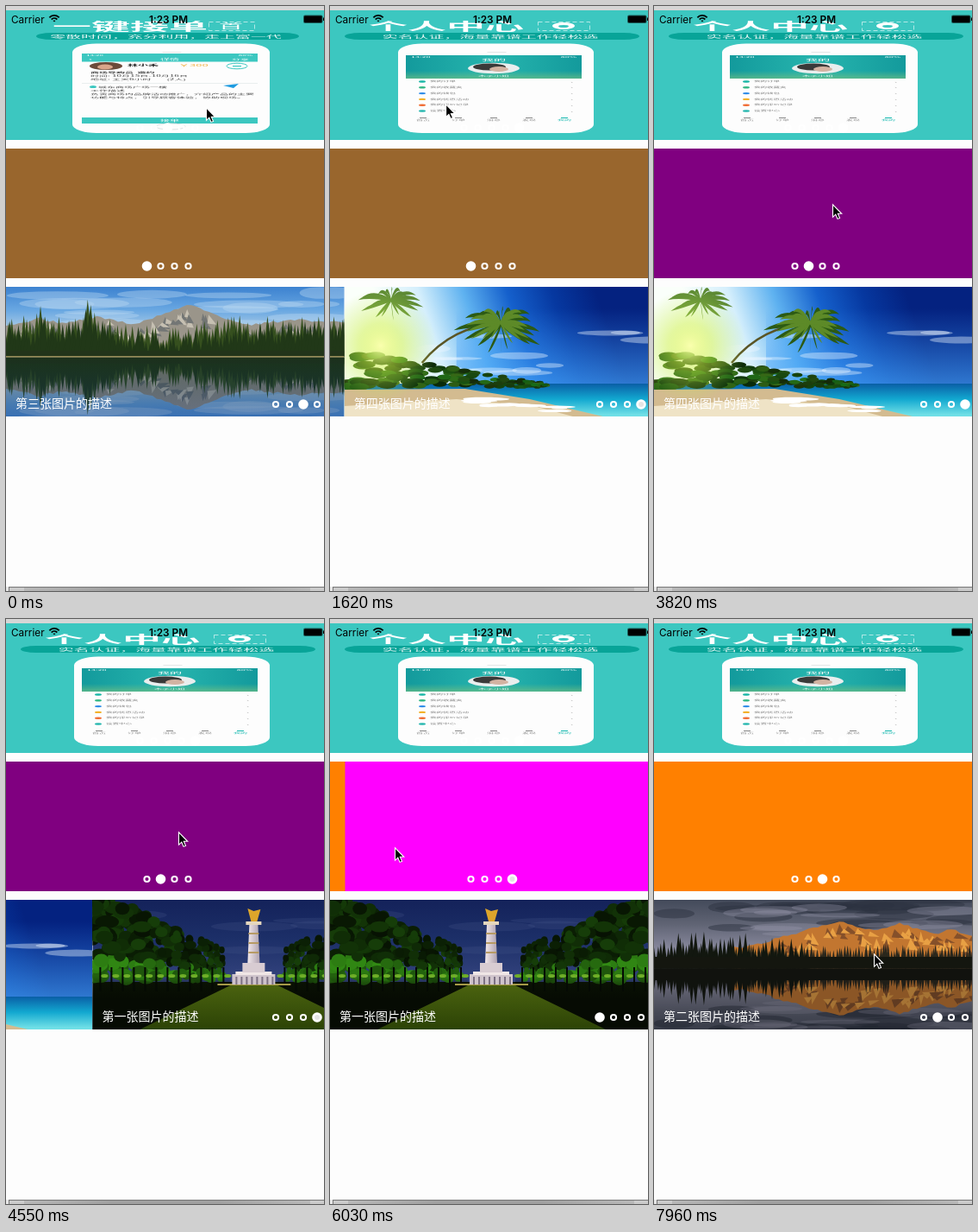
Write an HTML page with a canvas that moves like this. It is 369x677 px and loops after 8 s.

```html
<!DOCTYPE html>
<html lang="zh">
<head>
<meta charset="utf-8">
<title>Carousels</title>
<style>
html, body { margin: 0; width: 100%; height: 100%; overflow: hidden; background: #fdfdfd; }
canvas { display: block; width: 369px; height: 677px; }
</style>
</head>
<body>
<canvas id="stage" width="369" height="677"></canvas>
<script>
const ctx = document.getElementById('stage').getContext('2d');
const LOOP = 8000, TICK = 146.2, WIDTH = 369, PAGE = 375, TALL = 150, SQUASH = 0.28;
const CJK = '"Noto Sans CJK SC", "Noto Sans CJK JP", "Noto Sans CJK", sans-serif';
const TEAL = '#3cc7c0', DEEP = '#08a498';
const COLORS = ['#99662d', '#800080', '#ff8000', '#ff00ff'];

// Turning points of the hand: tick, x, y
const PATH = [[1, 232, 117], [4, 90, 110], [5, 170, 104], [7, 68, 98], [14, 177, 123], [16, 285, 220],
  [22, 125, 226], [26, 207, 229], [31, 200, 246], [36, 90, 255], [39, 215, 260], [41, 75, 264],
  [48, 240, 272], [54, 255, 387]];

// Eased 0 to 1 between two ticks
function glide(k, from, to) {
  const p = Math.min(1, Math.max(0, (k - from) / (to - from)));
  return p * p * (3 - 2 * p);
}

function posterPos(k) {
  const nudge = glide(k, 12, 13) - glide(k, 13, 14.6);
  return 2 + glide(k, 1, 4) + glide(k, 4.9, 8.9) + .05 * nudge;
}

function colorPos(k) {
  return glide(k, 18, 24.3) + glide(k, 34, 37) + glide(k, 39, 41.3) - glide(k, 45, 49);
}

// Turns by itself every three seconds
function photoPos(k) {
  const period = 20.45, turns = Math.floor((k - 9.15) / period), start = 9.15 + turns * period;
  return 2 + turns + glide(k, start, start + 2.12);
}

function handPos(k) {
  const [start, ...rest] = PATH;
  let [from, x, y] = start;
  for (const [to, nx, ny] of rest) {
    const p = glide(k, from, to);
    x += (nx - x) * p;
    y += (ny - y) * p;
    from = to;
  }
  return [x, y];
}

function seeded(seed) {
  return () => (seed = seed * 16807 % 2147483647) / 2147483647;
}

function repeat(n, seed, paint) {
  const rnd = seeded(seed * 9973);
  rnd();
  for (let i = 0; i < n; i++) paint(rnd, i);
}

function rect(color, x, y, w, h) {
  ctx.fillStyle = color;
  ctx.fillRect(x, y, w, h);
}

function round(color, x, y, w, h, rx, ry = rx) {
  ctx.fillStyle = color;
  ctx.beginPath();
  ctx.roundRect(x, y, w, h, [{ x: rx, y: ry }]);
  ctx.fill();
}

function oval(color, x, y, rx, ry = rx) {
  ctx.fillStyle = color;
  ctx.beginPath();
  ctx.ellipse(x, y, rx, ry, 0, 0, 7);
  ctx.fill();
}

function ring(color, x, y, rx, ry, width) {
  ctx.strokeStyle = color;
  ctx.lineWidth = width;
  ctx.beginPath();
  ctx.ellipse(x, y, rx, ry, 0, 0, 7);
  ctx.stroke();
}

function poly(color, ...pts) {
  ctx.fillStyle = color;
  ctx.beginPath();
  for (let i = 0; i < pts.length; i += 2) ctx.lineTo(pts[i], pts[i + 1]);
  ctx.closePath();
  ctx.fill();
}

function fade(x0, y0, x1, y1, ...colors) {
  const g = ctx.createLinearGradient(x0, y0, x1, y1);
  colors.forEach((c, i) => g.addColorStop(i / (colors.length - 1), c));
  return g;
}

// Poster text, flattened like the rest of the poster
function flat(str, x, y, size, color = '#fff', align = 'left', weight = 400) {
  ctx.save();
  ctx.translate(x, y);
  ctx.scale(1, SQUASH);
  ctx.font = `${weight} ${size}px ${CJK}`;
  ctx.textAlign = align;
  ctx.textBaseline = 'middle';
  ctx.fillStyle = color;
  ctx.fillText(str, 0, 0);
  ctx.restore();
}

function heading(title, titleX, sub, pillX, pillW, boxX, boxW) {
  flat(title, titleX, 23, 45, '#fff', 'left', 700);
  round(DEEP, pillX, 31, pillW, 8, 18, 4);
  flat(sub, pillX + pillW / 2 - 2, 35, 17.9, 'rgba(255,255,255,.9)', 'center', 500);
  ctx.strokeStyle = 'rgba(255,255,255,.6)';
  ctx.lineWidth = 1;
  ctx.setLineDash([5, 3]);
  ctx.strokeRect(boxX + .5, 18.5, boxW, 10);
  ctx.setLineDash([]);
}

function phone(x, w) {
  round('#fdfdfd', x, 43.5, w, 103.5, 28, 10);
  rect('#d8dede', x + w / 2 - 10, 53, 22, .7);
}

function navBar(x, title) {
  rect(TEAL, x, 55, 204, 9.5);
  flat('13:20', x + 5, 57, 8);
  flat('80%', x + 198, 57, 8, '#fff', 'right');
  flat(title, x + 102, 61.5, 11, '#fff', 'center');
  flat('‹', x + 8, 61.5, 14);
}

function orderPoster() {
  heading('一键接单', 54, '零散时间，充分利用，走上富一代', 35, 305, 235, 53);
  flat('首', 261, 23.5, 28, '#fff', 'center', 500);
  phone(77, 229);
  navBar(88, '详情');
  flat('分享', 282, 61.5, 10, '#fff', 'right');
  oval('#6b4a3a', 116, 69.5, 19, 4.6);
  oval('#d9a58a', 115, 70.5, 9, 3);
  flat('林小禾', 141, 69, 12, '#222', 'left', 700);
  flat('￥300', 200, 69, 13, '#f0b040');
  ring(TEAL, 268, 69.5, 12, 3.3, 1);
  rect(TEAL, 263, 69, 10, 1.2);
  const lines = ['商场导购员  邀约', '时间: 10月15日-10月16日', '地址: 全天6小时        (2人)', '',
    '    城东商场广场一楼', '工作描述', '负责商场内品牌活动推广，介绍产品的主要', '功能与特点，引导顾客体验，协助现场。'];
  lines.forEach((line, i) => flat(line, 98, 77 + i * 4.2, 10, '#444', 'left', i ? 400 : 700));
  rect('#e3e8e8', 88, 89, 204, .7);
  oval(TEAL, 101, 93.5, 4, 1.6);
  poly('#1e9be0', 252, 92, 270, 90, 264, 95);
  rect(TEAL, 88, 129, 204, 7);
  flat('接单', 190, 132.5, 11, '#fff', 'center');
  ring('#dfe5e5', 191, 139.5, 17, 3.5, 1);
}

function payPoster() {
  heading('薪资担保', 49, '费用轻松在线支付，安全快捷', 20, 336, 231, 53);
  oval('#fff', 259, 23.5, 15, 4.5);
  flat('S', 259, 23.5, 15, TEAL, 'center', 700);
  phone(74, 228);
  navBar(84, '支付');
  rect('#f05050', 94, 70, 141, 1);
  flat('订单金额', 94, 67, 9, '#555');
  flat('共两笔', 249, 69, 10, '#333');
  flat('￥300.00', 280, 75, 9, '#f0a030', 'right');
  flat('已付款', 280, 79, 9, '#666', 'right');
  round(TEAL, 155, 82, 80, 4.5, 3, 1);
  round('#f6a62b', 238, 82, 43, 4.5, 3, 1);
}

function profilePoster() {
  heading('个人中心', 45, '实名认证，海量靠谱工作轻松选', 17, 342, 241, 60);
  oval('#fff', 271, 23, 13, 4);
  oval(TEAL, 271, 23.5, 6, 1.6);
  phone(79, 227);
  rect(fade(88, 0, 292, 0, '#139a9c', '#27b5ae', '#139a9c'), 88, 57, 204, 27);
  rect(fade(0, 75, 0, 84, 'rgba(110,190,130,0)', 'rgba(110,190,130,.7)'), 88, 75, 204, 9);
  flat('13:20', 94, 58.6, 9);
  flat('80%', 286, 58.6, 9, '#fff', 'right');
  flat('我的', 190, 63, 14, '#fff', 'center');
  oval('#e9eeee', 190, 72, 30, 6.2);
  oval('#3a3a39', 185, 70.5, 19, 4);
  oval('#d3b3a2', 196, 73, 11, 3);
  flat('木子小姐', 190, 81, 9, 'rgba(255,255,255,.8)', 'center');
  const rows = [['我的订单', '#15b5a5'], ['我的收藏夹', '#35b886'], ['我的钱包', '#2d8be8'],
    ['我的优惠活动', '#f3b22b'], ['我的评价记录', '#f06b32'], ['设置中心', '#25b6ae']];
  rows.forEach(([label, color], i) => {
    const y = 87.5 + i * 6.8;
    oval(color, 107, y, 4, 1.2);
    flat(label, 116, y, 7.5, '#777');
    flat('›', 279, y, 10, '#999');
  });
  ['首页', '订单', '消息', '发现', '我的'].forEach((label, i) => {
    const x = 108 + i * 41, color = i < 4 ? '#888' : '#16b8af';
    rect(color, x - 4, 129, 8, 1);
    flat(label, x, 132.3, 8, color, 'center');
  });
}

const POSTERS = [null, null, orderPoster, payPoster, profilePoster];

function peak(x, center, half, height) {
  return Math.max(0, height * (1 - Math.abs(x - center) / half));
}

function clouds(color, seed, n, top, bottom, size) {
  repeat(n, seed, rnd => {
    const x = rnd() * PAGE, y = top + rnd() * (bottom - top);
    oval(color, x, y, size * (.5 + rnd()), size * (.06 + .1 * rnd()));
  });
}

// A rough crest line with light and dark facets below it
function mountain(color, light, dark, seed, left, crest) {
  const pts = [left, 85], rnd = seeded(seed);
  for (let x = left; x <= PAGE + 5; x += 5) pts.push(x, crest(x) + 3 * rnd());
  poly(color, ...pts, PAGE + 5, 85);
  repeat(70, seed, rnd => {
    const x = left + rnd() * (PAGE - left), y = crest(x) + 3 + rnd() * 14, h = 5 + rnd() * 10;
    poly(rnd() < .55 ? light : dark, x, y, x + 3 + rnd() * 9, y + h, x - rnd() * 6, y + h * .9);
  });
}

function conifers(color, seed, from, to, base, height) {
  const rnd = seeded(seed);
  for (let x = from; x < to; x += 2 + 3 * rnd()) {
    const h = height(x, rnd()), w = 2 + h * .09;
    poly(color, x - w, base, x - w * .4, base - h * .55, x, base - h, x + w * .4, base - h * .55, x + w, base);
  }
}

// A scene above the water and its darkened reflection
function mirrored(scene, axis, shade) {
  scene();
  ctx.save();
  ctx.beginPath();
  ctx.rect(0, axis, PAGE, TALL - axis);
  ctx.clip();
  ctx.translate(0, 2 * axis);
  ctx.scale(1, -1);
  scene();
  ctx.restore();
  rect(shade, 0, axis, PAGE, TALL - axis);
}

function lakeScene() {
  rect(fade(0, 0, 0, 55, '#3c82d0', '#6aa8e2', '#c0d6e6'), 0, 0, PAGE, 85);
  clouds('rgba(185,216,240,.4)', 12, 16, 6, 42, 45);
  mountain('#9a958a', '#c6c0b2', '#737675', 31, 0, x => 45 - Math.max(
    peak(x, 212, 70, 26), peak(x, 105, 60, 12), peak(x, 40, 40, 10), peak(x, 340, 80, 9)));
  conifers('#66753a', 15, 0, PAGE, 81, (x, r) => 17 + 10 * r);
  const forest = (x, r) => 26 + 22 * r - peak(x, 185, 75, 15) + peak(x, 97, 12, 26) + peak(x, 40, 14, 15);
  conifers('#36501f', 71, 0, PAGE, 81, forest);
  conifers('#213818', 29, 0, PAGE, 81, (x, r) => forest(x, r) * .9);
  rect('#22341a', 0, 74, PAGE, 8);
}

function lake() {
  mirrored(lakeScene, 81.5, fade(0, 82, 0, 150, 'rgba(20,45,30,.45)', 'rgba(10,45,110,.35)'));
  rect('#948a56', 0, 80, PAGE, 1.6);
}

function sunsetScene() {
  rect(fade(0, 0, 0, 55, '#434a5a', '#5f6373', '#85869a'), 0, 0, PAGE, 85);
  clouds('rgba(45,50,64,.5)', 13, 22, 0, 35, 45);
  clouds('rgba(150,148,168,.35)', 24, 12, 8, 40, 35);
  mountain('#c27630', '#e8a044', '#85502a', 47, 90, x => 54 - Math.max(
    peak(x, 215, 110, 31), peak(x, 285, 100, 28), peak(x, 345, 80, 21)));
  conifers('#2a271c', 17, 110, PAGE, 81, (x, r) => 22 + 8 * r);
  conifers('#12170f', 53, 0, 180, 81, (x, r) => 26 + 20 * r - peak(x, 180, 90, 12));
  rect('#14160f', 0, 66, PAGE, 16);
}

function sunset() {
  mirrored(sunsetScene, 79.5, 'rgba(12,12,14,.3)');
}

function avenue() {
  repeat(260, 97, rnd => {
    const d = rnd(), top = 62 * d ** 1.2 - 4, v = rnd(), y = top + v * (92 - top);
    const glow = v > .72 ? 18 + 14 * rnd() : 4 + 10 * rnd();
    oval(`hsl(105 75% ${glow}%)`, d * 152, y, (15 - 10 * d) * (.5 + rnd() * .5), 8 - 4 * d);
  });
  rect(fade(0, 88, 0, 115, 'rgba(4,10,2,0)', '#060b03'), 0, 88, 160, 62);
  for (let x = 8; x < 160; x += 13) {
    rect('#050a04', x, 78, 2, 28);
    oval('#6fae28', x + 6, 88, 4, 2);
  }
}

function monument() {
  rect(fade(0, 0, 0, 90, '#14225a', '#1c2f68', '#32427c'), 0, 0, PAGE, TALL);
  clouds('rgba(70,85,135,.25)', 19, 10, 10, 60, 45);
  rect('#0c1404', 0, 95, PAGE, 55);
  avenue();
  ctx.save();
  ctx.translate(PAGE, 0);
  ctx.scale(-1, 1);
  avenue();
  ctx.restore();
  poly(fade(0, 99, 0, 150, '#4a620f', '#2c4306'), 160, 99, 215, 99, 320, 150, 55, 150);
  rect('#a59a48', 145, 97, 85, 2);
  rect('#cfc4cc', 162, 86, 50, 12);
  for (let x = 166; x < 210; x += 6) rect('#7d7284', x, 89, 2, 9);
  rect('#f0e6e6', 166, 83, 42, 4);
  rect('#d8ccd2', 174, 73, 26, 11);
  poly(fade(180, 0, 195, 0, '#f2e8ea', '#a99dac'), 182, 28, 192, 28, 194, 73, 180, 73);
  for (let y = 38; y < 70; y += 11) rect('#b79b65', 181, y, 12, 2);
  rect('#e4d6bd', 178, 25, 18, 4);
  poly('#dca52b', 184, 25, 180, 10, 187, 13, 195, 11, 191, 25);
}

function palm(x, y, size, color, seed) {
  repeat(18, seed, (rnd, i) => {
    const a = i / 18 * 6.283 + rnd() * .4, r = size * (.65 + rnd() * .4);
    const dx = Math.cos(a) * r, dy = Math.sin(a) * r * .5;
    const tipX = x + dx, tipY = y + dy + size * .16, midX = x + dx * .6, midY = y + dy - size * .12;
    ctx.fillStyle = color;
    ctx.beginPath();
    ctx.moveTo(x, y);
    ctx.quadraticCurveTo(midX, midY, tipX, tipY);
    ctx.quadraticCurveTo(midX, midY + size * .2, x, y + 3);
    ctx.fill();
  });
}

function beach() {
  rect(fade(60, 80, 290, 0, '#fafffa', '#d5effc', '#5fb2f0', '#1560cc', '#0638a0', '#042280'), 0, 0, PAGE, TALL);
  rect(fade(0, 25, 0, 112, 'rgba(60,150,245,0)', 'rgba(70,165,250,.65)'), 130, 25, 245, 87);
  clouds('rgba(235,246,255,.4)', 21, 14, 45, 100, 28);
  rect(fade(0, 112, 0, 148, '#0a5fa6', '#12a8d0', '#6fdfe6'), 0, 112, PAGE, 38);
  repeat(150, 43, rnd => {
    const x = rnd() * 235, top = 72 + x * .17, y = top + rnd() * (116 - top);
    oval(`hsl(${95 + 25 * rnd()} 65% ${10 + 16 * rnd()}%)`, x, y, 12 - x * .035, 4.5 - x * .012);
  });
  poly('#d3bb90', 0, 119, 140, 118, 215, 130, 300, 150, 0, 150);
  poly('#efe3c6', 0, 138, 130, 130, 220, 138, 265, 150, 0, 150);
  repeat(16, 65, rnd => {
    const x = 130 + rnd() * 120;
    oval('#fff', x, 126 + (x - 130) * .1 + rnd() * 8, 8 + rnd() * 16, 1 + rnd());
  });
  ctx.strokeStyle = '#5a5526';
  ctx.lineWidth = 2.5;
  ctx.beginPath();
  ctx.moveTo(90, 88);
  ctx.quadraticCurveTo(125, 45, 182, 42);
  ctx.stroke();
  palm(182, 43, 54, '#2c5a14', 31);
  palm(181, 40, 42, '#5d8a28', 83);
  palm(54, 14, 40, '#5d8a34', 61);
  const glow = ctx.createRadialGradient(42, 68, 0, 42, 68, 65);
  glow.addColorStop(0, 'rgba(250,255,170,.95)');
  glow.addColorStop(.4, 'rgba(205,240,70,.5)');
  glow.addColorStop(1, 'rgba(190,235,80,0)');
  rect(glow, 0, 0, 125, 145);
}

const PHOTOS = [monument, sunset, lake, beach];

function posterPage(i) {
  rect(TEAL, 0, 5, PAGE + 1, TALL);
  if (POSTERS[i]) POSTERS[i]();
}

function colorPage(i) {
  rect(COLORS[i], 0, 165, PAGE + 1, TALL);
}

function photoPage(i) {
  ctx.save();
  ctx.translate(0, 325);
  ctx.beginPath();
  ctx.rect(0, 0, PAGE, TALL);
  ctx.clip();
  PHOTOS[i]();
  ctx.font = `14px ${CJK}`;
  ctx.fillStyle = '#fff';
  ctx.textAlign = 'left';
  ctx.textBaseline = 'alphabetic';
  ctx.fillText(`第${'一二三四'[i]}张图片的描述`, 11, 140);
  ctx.restore();
}

function dots(pos, count, x, y) {
  const active = Math.floor(pos + .1) % count, moving = pos % 1 > .7;
  for (let i = 0; i < count; i++) {
    const cx = x + i * 16;
    if (i !== active) ring('#fff', cx, y, 3.1, 3.1, 2);
    else oval('#fff', cx, y, 5.8);
    if (i === active && moving) oval('rgba(120,120,120,.2)', cx, y, 3);
  }
}

function carousel(pos, count, y, paint, dotX, dotY) {
  ctx.save();
  ctx.beginPath();
  ctx.rect(0, y, WIDTH, TALL);
  ctx.clip();
  const first = Math.floor(pos);
  for (const i of [first, first + 1]) {
    const x = (i - pos) * PAGE;
    if (x >= WIDTH) continue;
    ctx.save();
    ctx.translate(x, 0);
    paint(i % count);
    ctx.restore();
  }
  ctx.restore();
  dots(pos, count, dotX, dotY);
}

function statusBar() {
  ctx.fillStyle = '#000';
  ctx.textBaseline = 'alphabetic';
  ctx.textAlign = 'left';
  ctx.font = '11.8px Inter, Roboto, sans-serif';
  ctx.fillText('Carrier', 6, 19.5);
  ctx.textAlign = 'center';
  ctx.font = '600 11.8px Inter, Roboto, sans-serif';
  ctx.fillText('1:23 PM', 188.5, 19.5);
  ctx.strokeStyle = '#000';
  ctx.lineWidth = 1.8;
  for (const r of [1.2, 4.4, 7.6]) {
    ctx.beginPath();
    ctx.arc(56, 18.5, r, -2.4, -.74);
    ctx.stroke();
  }
  round('rgba(0,0,0,.55)', 345, 10.5, 22.5, 9.5, 2);
  round('#000', 346, 11.5, 20.5, 7.5, 1);
  rect('#000', 368, 13.5, 1, 3.5);
}

function windowEdges() {
  rect('#d6d6d6', 0, 0, WIDTH, 5);
  rect('#e6e6e6', 0, 672, WIDTH, 5);
  rect(fade(0, 0, WIDTH, 0, '#bcbcbc', '#a0a0a0', '#a0a0a0', '#bcbcbc'), 3, 672, 366, 5);
  rect('#cacaca', 4, 673, 17, 4);
  rect('#cacaca', 353, 673, 16, 4);
  rect('#777', 3, 672, 366, 1);
  rect('#777', 3, 672, 1, 5);
}

function cursor(x, y) {
  ctx.save();
  ctx.translate(x + .5, y + .8);
  poly('#000', 0, 0, 0, 14.5, 3.3, 11.4, 5.5, 16.6, 8, 15.6, 5.8, 10.5, 10.2, 10.5);
  ctx.strokeStyle = '#fff';
  ctx.lineWidth = 1.1;
  ctx.stroke();
  ctx.restore();
}

function draw(k) {
  rect('#fdfdfd', 0, 0, WIDTH, 677);
  carousel(posterPos(k), 5, 5, posterPage, 155.5, 141);
  carousel(colorPos(k), 4, 165, colorPage, 163.5, 301);
  carousel(photoPos(k), 4, 325, photoPage, 313, 461);
  windowEdges();
  statusBar();
  cursor(...handPos(k));
}

let shown = -1;
function play() {
  const k = Math.floor(performance.now() % LOOP / TICK);
  if (k !== shown) draw(shown = k);
  requestAnimationFrame(play);
}
play();
</script>
</body>
</html>
```
